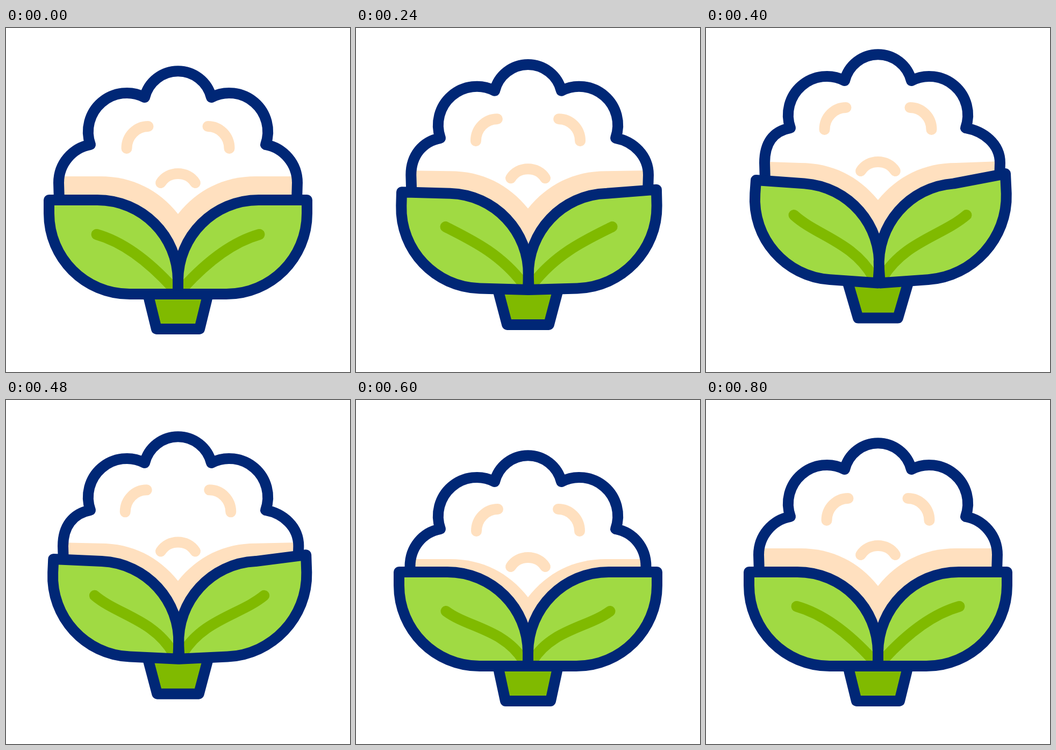
These frames come from a looping animation (640x640 px, 1480 ms). An HTML page with a canvas:

```html
<!DOCTYPE html>
<html lang="en">
<head>
<meta charset="utf-8">
<title>Cauliflower</title>
<style>
  html, body { margin: 0; width: 100%; height: 100%; overflow: hidden; background: #fff; }
  canvas { display: block; width: 100%; height: 100%; }
</style>
</head>
<body>
<canvas id="stage" width="640" height="640"></canvas>
<script>
const ctx = document.getElementById('stage').getContext('2d');
const NAVY = '#002776', LEAF = '#a0da43', VEIN = '#80ba00', CREAM = '#ffe0bf';
const LOOP = 1480, STEP = 40, MID = 320, LIFT = 20.6;
const SIDES = [-1, 1];

// Weights of the jump (up) and of the squash on landing (down).
let up = 0, down = 0;

function setPose(t) {
  const ease = (a, b) => {
    const x = Math.min(1, Math.max(0, (t - a) / (b - a)));
    return x * x * (3 - 2 * x);
  };
  const rise = ease(120, 400), fall = ease(400, 600), settle = ease(600, 800);
  up = rise - fall;
  down = fall - settle;
}

const shift = (high, low) => up * high + down * low;

// A point at distance d from the middle axis.
const pt = (side, d, y) => `${MID + side * d} ${y} `;

function stroke(path, color) {
  ctx.strokeStyle = color;
  ctx.stroke(new Path2D(path));
}

function fill(path, color) {
  ctx.fillStyle = color;
  ctx.fill(new Path2D(path));
}

function drawHead() {
  const y = shift(-31, 23);
  const footY = 288 + shift(-37, 22);
  const foot = side => 222 + shift(8 * side - 3, -2.5);
  const [l, r] = SIDES.map(foot);
  const outline = `M${pt(-1, l - 1, footY + 34)} L${pt(-1, l, footY)}
    C${pt(-1, l, footY - 36)} ${pt(-1, 196, 223 + y)} ${pt(-1, 163, 217 + y)}
    A72 72 0 0 1 ${pt(-1, 62, 129 + y)}
    A63.8 63.8 0 0 1 ${pt(1, 62, 129 + y)}
    A72 72 0 0 1 ${pt(1, 163, 217 + y)}
    C${pt(1, 196, 223 + y)} ${pt(1, r, footY - 36)} ${pt(1, r, footY)}
    L${pt(1, r - 1, footY + 34)}`;

  ctx.save();
  ctx.clip(new Path2D(`${outline} L${MID} ${430 - LIFT * up} Z`));
  const top = 276 + shift(-25, 20), tip = 346 + shift(-26, 21);
  for (const side of SIDES) {
    fill(`M${MID} 460 V${tip} C${pt(side, 36, top + 25)} ${pt(side, 85, top)} ${pt(side, 145, top)}
      L${pt(side, 230, top - 3 * up)} V460 Z`, CREAM);
  }
  ctx.restore();

  for (const side of SIDES) {
    const d = 95.5 + shift(4, 0.5);
    stroke(`M${pt(side, d, 224 + shift(-35, 20))} c0 -23 ${-18 * side} -41 ${-40 * side} -41`, CREAM);
  }
  stroke(`M288 ${288 + shift(-22, 22)} c7 -11 19 -17 32 -17 s25 6 32 17`, CREAM);
  stroke(outline, NAVY);
}

function drawStem() {
  const dy = -LIFT * up, base = 40 + shift(-3, 2);
  const path = `M${pt(-1, 56, 495 + dy)} L${pt(-1, base, 560 + dy)}
    L${pt(1, base, 560 + dy)} L${pt(1, 56, 495 + dy)}`;
  fill(path, VEIN);
  stroke(path, NAVY);
}

// The vein bends from a plain arc into an S as the plant moves.
function veinPath(side) {
  const sway = up + down;
  const d = 151.5 + shift(9 + 4 * side, 1), y = 384 + shift(-36, 9);
  const endD = 9, endY = 484 - LIFT * up;
  const along = (k, dd, dy) => pt(side, d + (endD - d) * k + dd, y + (endY - y) * k + dy);
  return `M${along(0, 0, 0)} C${along(1 / 3, 7 * sway, 20 * sway - 20)}
    ${along(2 / 3, -12 * sway, -19 - 8 * sway)} ${along(1, 0, 0)}`;
}

// side is -1 for the left leaf and 1 for the right one.
function drawLeaf(side) {
  const angle = -side * up * 4 * Math.PI / 180;
  const c = Math.cos(angle), s = Math.sin(angle);
  const pull = side > 0 ? up : 0; // only the right tip is pulled upwards
  const at = (d, y, ex = 0, ey = 0) => {
    const x = side * d;
    return `${MID + (2 + 1.8 * side) * up + x * c - y * s + ex * pull} ` +
      `${495 - LIFT * up + x * s + y * c + ey * pull} `;
  };
  const path = `M${at(240, -175, 6, -12)} L${at(150, -175)}
    C${at(67, -175)} ${at(0, -108)} ${at(0, -25)}
    L${at(0, 0)} L${at(90, 0)}
    C${at(173, 0)} ${at(240, -67, 3)} ${at(240, -150, 6)} Z`;
  fill(path, LEAF);
  stroke(veinPath(side), VEIN);
  stroke(path, NAVY);
}

function draw(t) {
  setPose(t);
  ctx.fillStyle = '#fff';
  ctx.fillRect(0, 0, 640, 640);
  ctx.lineWidth = 20;
  ctx.lineCap = ctx.lineJoin = 'round';
  drawHead();
  drawStem();
  SIDES.forEach(drawLeaf);
}

function tick(now) {
  draw(Math.floor(now % LOOP / STEP) * STEP);
  requestAnimationFrame(tick);
}
tick(0);
</script>
</body>
</html>
```
